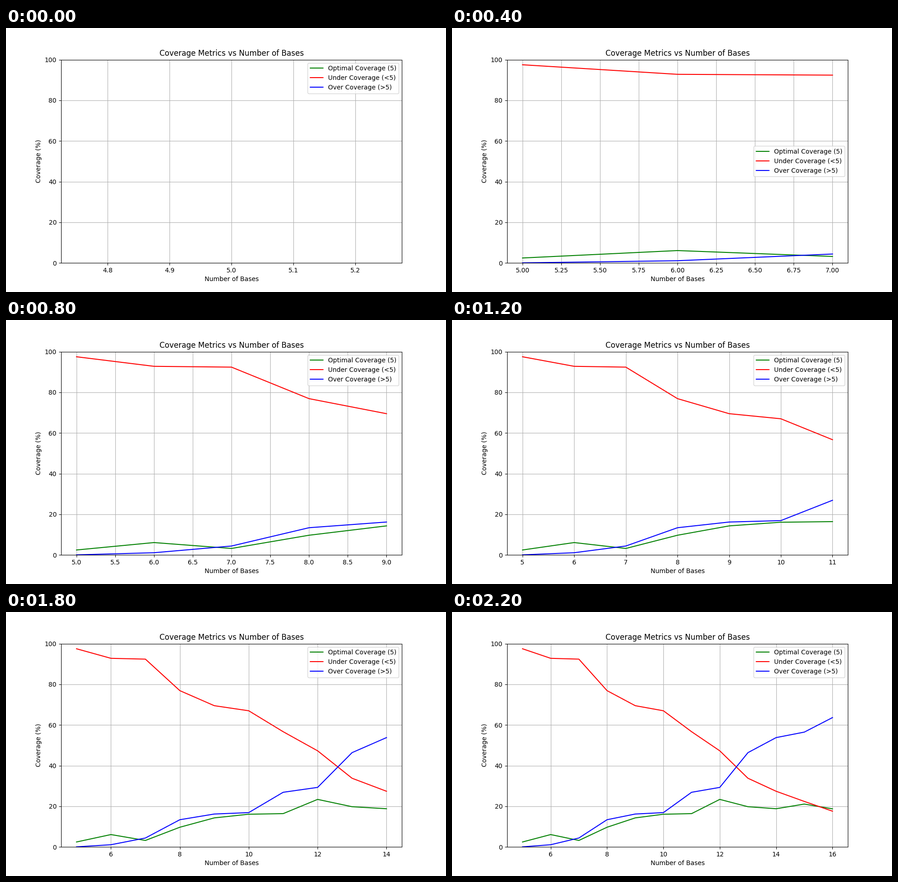
Recreate the animation shown at these times as a matplotlib script. Size 966x580 px, loop 2.4 s.

```python
import numpy as np
import matplotlib.pyplot as plt
from matplotlib.animation import FuncAnimation

DPI = 100
bases = np.arange(5, 17)
under = np.array([97.5, 92.8, 92.4, 76.9, 69.5, 67.0,
                  56.7, 47.3, 33.8, 27.4, 22.4, 17.6])
over = np.array([0.05, 1.1, 4.4, 13.4, 16.2, 16.9,
                 26.9, 29.3, 46.4, 53.8, 56.5, 63.65])
optimal = 100 - under - over

SERIES = [
    (optimal, "green", "Optimal Coverage (5)"),
    (under, "red", "Under Coverage (<5)"),
    (over, "blue", "Over Coverage (>5)"),
]

fig, ax = plt.subplots(figsize=(966 / DPI, 580 / DPI), dpi=DPI)


def draw(i):
    """Show the first i + 1 points; axis limits and legend adapt to them."""
    ax.clear()
    n = i + 1
    for values, color, label in SERIES:
        ax.plot(bases[:n], values[:n], color=color, label=label)
    ax.set_ylim(0, 100)
    ax.set_title("Coverage Metrics vs Number of Bases")
    ax.set_xlabel("Number of Bases")
    ax.set_ylabel("Coverage (%)")
    ax.grid(True)
    ax.legend(loc="best")
    return ax.lines


anim = FuncAnimation(fig, draw, frames=len(bases), interval=200,
                     init_func=lambda: draw(0), repeat=True)
plt.show()
```
